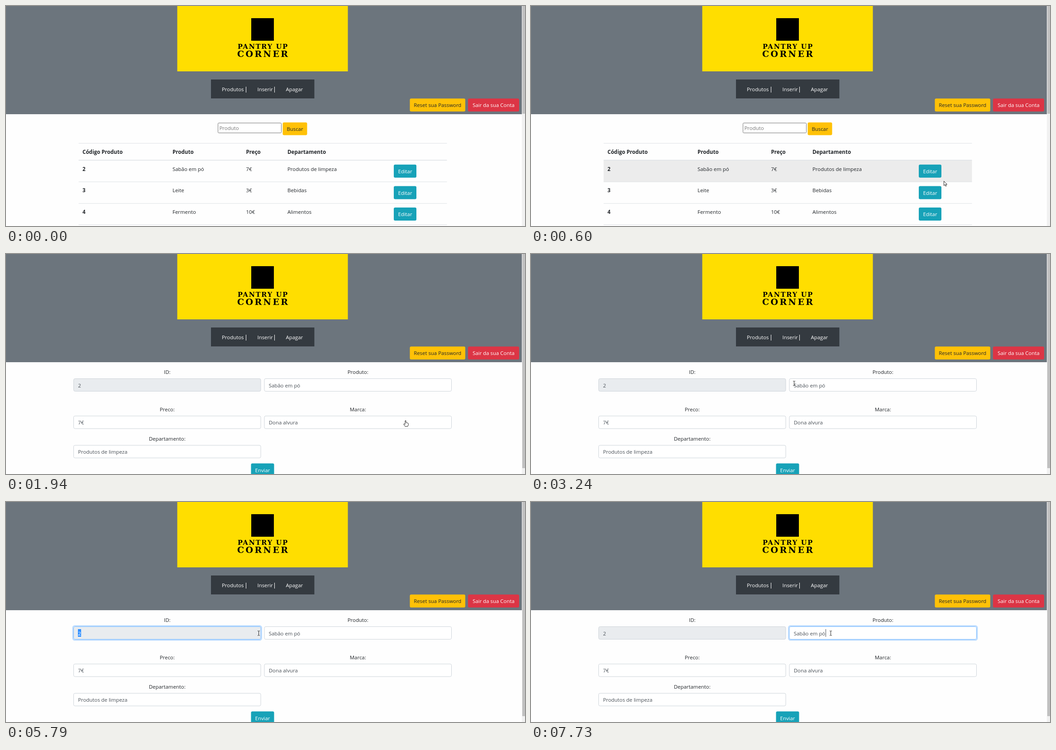
Animation of 1147 by 488 pixels, one loop 8 s. Source, as an HTML page with a canvas:

```html
<!DOCTYPE html>
<html lang="pt">
<head>
<meta charset="utf-8">
<title>Produtos</title>
<style>
html, body { margin: 0; width: 100%; height: 100%; overflow: hidden; background: #fefefe; }
canvas { display: block; }
</style>
</head>
<body>
<canvas id="stage" width="1147" height="488"></canvas>
<script>
const ctx = document.getElementById('stage').getContext('2d');
const LOOP = 8000, STEP = 78, PAGE_SWITCH = 1940;
const SANS = '"Open Sans", "Noto Sans", sans-serif';
const SERIF = '"DejaVu Serif", "Noto Serif", serif';
const BODY = '11.4px ' + SANS, BOLD = 'bold 11.6px ' + SANS;
const INK = '#212529', AMBER = '#ffc107', TEAL = '#17a2b8', LINE = '#dee2e6';

const rows = [
  ['2', 'Sabão em pó', '7€', 'Produtos de limpeza'],
  ['3', 'Leite', '3€', 'Bebidas'],
  ['4', 'Fermento', '10€', 'Alimentos']
];
const columns = [169, 368, 530.5, 622];
const ROW_TOP = 342.3, ROW_H = 47.7;

const fields = [
  { label: 'ID:', value: '2', x: 149.5, y: 276.5, readOnly: true, focus: [3780, 6250] },
  { label: 'Produto:', value: 'Sabão em pó', x: 571, y: 276.5, focus: [6250, LOOP] },
  { label: 'Preco:', value: '7€', x: 149.5, y: 359.3 },
  { label: 'Marca:', value: 'Dona alvura', x: 571, y: 359.3 },
  { label: 'Departamento:', value: 'Produtos de limpeza', x: 149.5, y: 424.3 }
];
const FIELD_W = 413.5, FIELD_H = 28;

// Each move advances in fixed steps along its points.
const moves = [
  { start: 290, steps: 11, ease: 3.25, points: [[1031, 454], [884, 372]] },
  { start: 1150, steps: 3, ease: 1, points: [[884, 371], [883, 369]] },
  { start: 2640, steps: 4, ease: 1, points: [[760, 340], [610, 292], [548, 284], [603, 292]] },
  { start: 3240, steps: 6, ease: 1.5, points: [[581, 287], [517, 287]] },
  { start: 5710, steps: 5, ease: 1.4, points: [[530, 288], [614, 297]] },
  { start: 7120, steps: 3, ease: 1.4, points: [[630, 295], [662, 291]] }
];
const clicks = [[1610, 1860], [3780, 4320], [6250, 6490], [7580, 7730]];

const within = (t, [a, b]) => t >= a && t < b;
const fadeIn = (t, start) => Math.min(1, (Math.floor((t - start) / STEP) + 1) / 3);

function rect(x, y, w, h, color) {
  ctx.fillStyle = color;
  ctx.fillRect(x, y, w, h);
}

function rounded(x, y, w, h, r, fill, stroke) {
  ctx.beginPath();
  ctx.roundRect(x, y, w, h, r);
  if (fill) { ctx.fillStyle = fill; ctx.fill(); }
  if (stroke) { ctx.strokeStyle = stroke; ctx.lineWidth = 1; ctx.stroke(); }
}

function text(str, x, y, color = INK, font = BODY, align = 'left') {
  ctx.font = font;
  ctx.fillStyle = color;
  ctx.textAlign = align;
  ctx.fillText(str, x, y);
}

function button(label, x, y, w, h, fill, color) {
  rounded(x, y, w, h, 3, fill);
  text(label, x + w / 2, y + h / 2 + 4.8, color, BODY, 'center');
}

function ring(x, y, w, h, color, alpha) {
  ctx.save();
  ctx.globalAlpha = alpha;
  ctx.strokeStyle = color;
  ctx.lineWidth = 2.4;
  ctx.beginPath();
  ctx.roundRect(x - 1.2, y - 1.2, w + 2.4, h + 2.4, 4);
  ctx.stroke();
  ctx.restore();
}

function spaced(str, y, size, gap) {
  ctx.letterSpacing = gap + 'px';
  text(str, 567 + gap / 2, y, '#000', `bold ${size}px ${SERIF}`, 'center');
  ctx.letterSpacing = '0px';
}

function header(thumb) {
  rect(0, 0, 1147, 488, '#fefefe');
  rect(0, 0, 1140, 240, '#6c757d');
  rect(378.5, 0, 377, 145, '#ffde00');
  rect(542, 27, 50, 50, '#000');
  spaced('PANTRY UP', 95, 14.5, 1.8);
  spaced('CORNER', 112.5, 19, 3.4);

  rect(453, 163, 228.5, 42, '#343a40');
  text('Produtos', 477, 189, '#fff');
  text('Inserir', 555.5, 189, '#fff');
  text('Apagar', 618.5, 189, '#fff');
  for (const x of [530, 593]) rect(x, 179, 1, 13, '#fff');

  button('Reset sua Password', 892.5, 205.3, 122.5, 28.7, AMBER, INK);
  button('Sair da sua Conta', 1021, 205.3, 113, 28.7, '#dc3545', '#fff');

  rect(1140, 0, 7, 488, '#f1f1f1');
  rect(1141, 0, 6, thumb, '#c1c1c1');
}

function listPage(t, cursor) {
  rounded(468.5, 259.5, 140, 22, 2, '#fff', '#767676');
  text('Produto', 471.5, 275, '#757575');
  button('Buscar', 611.5, 258.3, 54, 28.2, AMBER, INK);

  rect(160.5, 304, 814, 1, LINE);
  ['Código Produto', 'Produto', 'Preço', 'Departamento']
    .forEach((title, i) => text(title, columns[i], 328, INK, BOLD));

  rows.forEach((row, i) => {
    const y = ROW_TOP + i * ROW_H;
    if (cursor && cursor.x < 974 && within(cursor.y, [y, y + ROW_H]))
      rect(160.5, y, 814, ROW_H, '#ececec');
    rect(160.5, Math.round(y + ROW_H) - 0.5, 814, 1, LINE);
    row.forEach((cell, c) => text(cell, columns[c], y + 23.4, INK, c ? BODY : BOLD));

    const by = y + 9.4;
    let fill = TEAL;
    if (cursor && i === 0 && overEdit(cursor)) fill = t < 1610 ? '#138496' : '#117a8b';
    if (i === 0 && t >= 1610)
      ring(857, by, 50, 29, 'rgba(58,176,195,0.6)', fadeIn(t, 1610));
    button('Editar', 857, by, 50, 29, fill, '#fff');
  });
  rect(160.5, 341.3, 814, 1.5, LINE);
}

function formPage(t) {
  for (const f of fields) {
    const focused = f.focus && within(t, f.focus);
    text(f.label, f.x + FIELD_W / 2, f.y - 10.5, INK, BODY, 'center');
    if (focused)
      ring(f.x - 0.5, f.y - 0.5, FIELD_W + 1, FIELD_H + 1, 'rgba(0,123,255,0.27)', fadeIn(t, f.focus[0]));
    rounded(f.x, f.y, FIELD_W, FIELD_H, 3, f.readOnly ? '#e9ecef' : '#fff', focused ? '#80bdff' : '#ced4da');
    const selected = f.readOnly && within(t, [3940, 6250]);
    if (selected) rect(159, 282, 7, 17, '#2f8fff');
    text(f.value, f.x + 9.7, f.y + 19, selected ? '#fff' : '#495057');
  }
  if (within(t, [6330, 6810]) || within(t, [7350, 7580])) rect(612, 282, 1, 17, '#495057');
  if (t >= 7580) rect(651, 282, 1, 17, '#495057');
  button('Enviar', 541.5, 464.5, 51, 29, TEAL, '#fff');
}

function overEdit(c) {
  return within(c.x, [857, 907]) && within(c.y, [352, 381]);
}

function cursorAt(t) {
  const m = moves.filter(move => t >= move.start).pop();
  if (!m) return null;
  const k = Math.min(m.steps - 1, Math.floor((t - m.start) / STEP + 0.1));
  const s = 1 - Math.pow(1 - k / (m.steps - 1), m.ease);
  const u = s * (m.points.length - 1);
  const i = Math.min(m.points.length - 2, Math.floor(u));
  const [a, b] = [m.points[i], m.points[i + 1]];
  return { x: a[0] + (b[0] - a[0]) * (u - i), y: a[1] + (b[1] - a[1]) * (u - i) };
}

function cursorKind(t, c) {
  if (t < 2640) return overEdit(c) ? 'hand' : 'arrow';
  const inField = fields.some(f =>
    within(c.x, [f.x, f.x + FIELD_W]) && within(c.y, [f.y, f.y + FIELD_H]));
  return inField ? 'beam' : 'arrow';
}

const shapes = {
  arrow: 'M.5 .5V10.3L2.8 8.2L4.4 11.8L6 11.1L4.5 7.6H7.5Z',
  hand: 'M-1 1Q0 -.3 1 1V5Q2.2 4.4 3 5.5Q4.2 5 4.8 6.1Q6.2 5.9 6.2 7.5V10L4.8 13.4H-1L-4 9Q-4.2 7.4 -2.6 7.8L-1 9Z',
  beam: 'M-2.5 -5H-.7L0 -4.4L.7 -5H2.5M0 -4.4V4.4M-2.5 5H-.7L0 4.4L.7 5H2.5'
};

function drawCursor(kind, c) {
  const path = new Path2D(shapes[kind]);
  ctx.save();
  ctx.translate(Math.round(c.x), Math.round(c.y));
  if (kind === 'beam') ctx.translate(0.5, 0);
  else { ctx.fillStyle = '#fff'; ctx.fill(path); }
  ctx.strokeStyle = '#111';
  ctx.lineWidth = 0.9;
  ctx.lineJoin = 'round';
  ctx.stroke(path);
  ctx.restore();
}

function draw(t) {
  const cursor = cursorAt(t);
  if (t < PAGE_SWITCH) {
    header(239);
    listPage(t, cursor);
  } else {
    header(475);
    formPage(t);
  }
  if (!cursor) return;
  if (clicks.some(span => within(t, span))) {
    ctx.beginPath();
    ctx.arc(cursor.x - 1, cursor.y - 1, 9, 0, Math.PI * 2);
    ctx.fillStyle = 'rgba(240,226,40,0.75)';
    ctx.fill();
  }
  drawCursor(cursorKind(t, cursor), cursor);
}

const began = performance.now();
function frame() {
  draw((performance.now() - began) % LOOP);
  requestAnimationFrame(frame);
}
frame();
</script>
</body>
</html>
```
